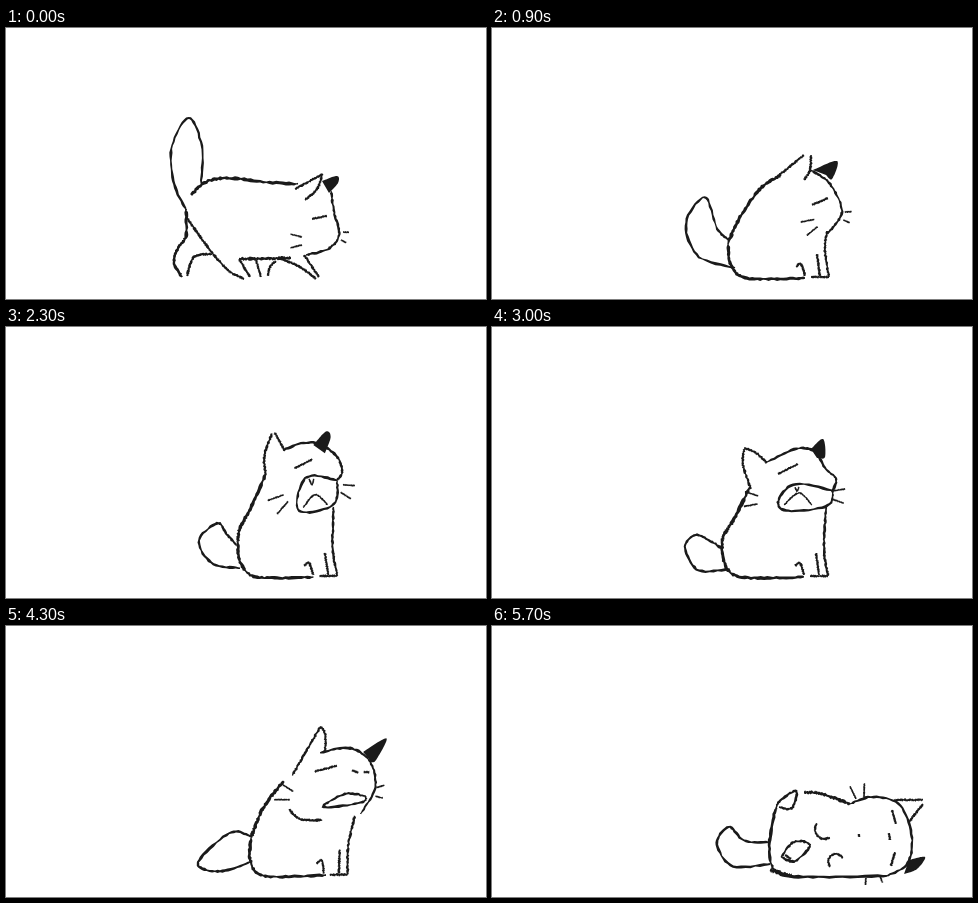
An HTML page that plays this animation: 480x271 px, repeating every 5800 ms.

```html
<!DOCTYPE html>
<html lang="en">
<head>
<meta charset="utf-8">
<title>Sleepy cat</title>
<style>
html, body { margin: 0; width: 100%; height: 100%; overflow: hidden; background: #fff; }
svg { display: block; width: 100vw; height: 100vh; }
path { fill: #1a1a1a; }
</style>
</head>
<body>
<svg id="stage" viewBox="0 0 480 271"></svg>
<script>
const LOOP = 5800, STEP = 100, FLOOR = 253, SAMPLES = 48;

const mix = (a, b, u) => a + (b - a) * u;
const noise = n => { const s = Math.sin(n * 12.9898) * 43758.5453; return s - Math.floor(s); };
const polar = (x, y, r, deg) => [x + r * Math.cos(deg * Math.PI / 180), y + r * Math.sin(deg * Math.PI / 180)];

// Stroke makers: all return a few points that a smooth curve runs through.
const line = text => text.split(' ').map(p => p.split(',').map(Number));
const arc = (x, y, r, from, to) => [0, 1, 2, 3, 4].map(i => polar(x, y, r, mix(from, to, i / 4)));

// Two hairs that spread from a spot.
function hairs(name, x, y, dir, length, gap = 4) {
  const hair = side => {
    const root = polar(x, y, gap * side, dir + 90);
    return [root, polar(...root, length, dir + 14 * side)];
  };
  return { [name + 'A']: hair(-1), [name + 'B']: hair(1) };
}

// The lower body shared by all sitting poses.
const seated = (left, right, chest) => ({
  rump: [[left, 215], [left + 2, 235], [left + 14, 249], [right - 55, 251], [right - 22, 250]],
  foot: [[right - 31, 239], [right - 26, 236], [right - 22, 248]],
  leg: [[right - 10, 226], [right - 7, 248]],
  front: [[right, chest], [right - 2, 222], [right + 2, 249]],
  paw: [[right - 16, 249], [right + 2, 249]]
});

const walk = {
  tail: line('195,158 196,120 183,90 166,118 168,155 180,182'),
  back: line('292,156 258,154 222,150 200,154 185,167'),
  rump: line('180,181 180,208 172,220 168,235 176,249'),
  haunch: line('181,190 193,207 207,226'),
  hindFar: line('206,226 188,229 181,248'),
  foot: line('207,226 223,243 238,251'),
  hind: line('233,231 244,249'),
  belly: line('233,231 285,230'),
  frontFarA: line('250,232 255,249'),
  frontFarB: line('270,233 264,239 262,248'),
  leg: line('275,231 294,239 310,251'),
  front: line('298,227 313,249'),
  ear: line('289,161 317,146'),
  ear2: line('316,147 311,161 299,172'),
  black: line('316,153 331,148 332,155 323,165'),
  top: line('325,163 328,184 333,207 322,221 300,227'),
  eye: line('306,191 321,188'),
  ...hairs('cheek', 296, 213, 180, 12),
  ...hairs('whisker', 336, 208, 15, 6)
};
const sit = {
  ...seated(236, 335, 203),
  tail: line('237,212 225,200 213,169 194,195 206,228 243,240'),
  back: line('289,147 268,161 247,191 236,215'),
  ear: line('285,149 312,127'),
  ear2: line('319,127 318,142 312,152'),
  black: line('321,142 345,133 340,151 334,147'),
  top: line('319,142 338,156 350,184 335,206'),
  eye: line('320,177 336,170'),
  ...hairs('cheek', 324, 195, 155, 14),
  ...hairs('whisker', 352, 188, 10, 7)
};
const yawn = {
  ...seated(233, 329, 180),
  tail: line('232,218 222,206 214,195 194,213 207,236 234,241'),
  back: line('263,146 248,178 236,200 233,215'),
  ear: line('263,147 263,128 272,105'),
  ear2: line('275,104 283,123'),
  black: line('310,118 323,104 328,108 322,126'),
  top: line('281,122 308,115 333,127 339,143 333,152'),
  eye: line('292,141 310,132'),
  mouth: line('333,152 303,150 295,184 329,178 333,152'),
  tongue: line('300,181 312,168 324,178'),
  fang: line('306,151 309,157 311,151'),
  ...hairs('cheek', 284, 171, 143, 18),
  ...hairs('whisker', 338, 161, 20, 12)
};
const wail = {
  ...seated(230, 334, 180),
  tail: line('231,222 218,214 204,208 193,220 206,243 238,242'),
  back: line('258,160 242,192 232,208 230,215'),
  ear: line('259,162 251,138 252,122'),
  ear2: line('252,121 264,126 275,136'),
  black: line('319,122 331,112 333,130 325,131'),
  top: line('275,135 303,122 322,124 333,141 344,152 340,165'),
  eye: line('286,147 306,137'),
  mouth: line('341,164 303,157 286,175 297,184 335,179 341,164'),
  tongue: line('292,178 307,166 320,178'),
  fang: line('303,160 305,164 307,160'),
  ...hairs('cheek', 266, 173, 184, 14),
  ...hairs('whisker', 340, 168, 5, 13)
};
const settle = {
  ...seated(238, 339, 195),
  tail: line('238,215 216,212 188,240 212,247 242,237'),
  back: line('260,163 245,188 238,215'),
  ear: line('267,158 288,112'),
  ear2: line('288,112 294,120 296,135'),
  black: line('335,134 356,121 349,141 345,143'),
  top: line('293,136 322,132 344,144 353,168 343,192'),
  eye: line('289,154 311,148'),
  eye2: line('327,152 334,154'),
  eye3: line('339,153 345,153'),
  mouth: line('347,177 326,175 306,187 343,183 347,177'),
  chin: line('272,189 285,198 307,199'),
  ...hairs('cheek', 270, 177, 193, 16),
  ...hairs('whisker', 355, 171, -3, 8)
};
const flop = {
  tail: line('269,180 250,170 229,184 249,197 261,215 273,234'),
  back: line('346,161 312,162 280,177 267,200'),
  rump: line('267,200 272,231 292,250 340,247 390,231'),
  ground: line('277,248 300,251'),
  ear: line('375,151 380,140 389,131'),
  ear2: line('390,131 395,134 395,157'),
  black: line('414,198 437,203 431,213 410,222'),
  top: line('346,161 375,152 402,168 414,195 390,231'),
  eye: line('386,160 392,171'),
  eye2: line('395,184 396,191'),
  eye3: line('404,201 402,211'),
  nose: line('369,196 370,198'),
  pawA: arc(295, 208, 9, -45, 150),
  pawB: arc(331, 196, 11, -95, -270),
  pawC: arc(310, 243, 9, 175, 360),
  pawD: arc(343, 234, 8, 160, 300),
  ...hairs('cheek', 359, 153, 254, 12, 7),
  ...hairs('whisker', 396, 230, 42, 8)
};
const sleep = {
  tail: line('278,216 253,215 237,201 225,217 240,240 278,238'),
  back: line('358,178 330,168 312,166'),
  rump: line('283,184 278,212 279,238 292,249 335,251 395,250'),
  ground: line('278,244 300,250'),
  hind: line('283,188 287,176 304,165 300,182 287,181'),
  ear: line('402,174 431,174'),
  ear2: line('431,178 417,196'),
  black: line('417,234 433,231 425,243 412,248'),
  top: line('358,178 380,171 408,179 420,212 415,238 395,250'),
  eye: line('400,184 404,198'),
  eye2: line('397,207 398,214'),
  eye3: line('403,226 399,240'),
  nose: line('367,208 367,211'),
  pawA: line('289,231 302,216 318,219 303,235 289,231'),
  pawB: arc(333, 203, 10, 215, 60),
  pawC: line('293,229 299,233'),
  pawD: arc(344, 236, 8, 140, 330),
  ...hairs('cheek', 368, 172, 258, 14),
  ...hairs('whisker', 381, 251, 82, 7, 7)
};

const widths = { back: 3, rump: 2.8, belly: 3, ground: 3.4, eye: 2.2 };
const isThin = name => /cheek|whisker|fang|tongue/.test(name);
const widthOf = name => widths[name] || (isThin(name) ? 1.7 : 2.3);
const swings = { hindFar: 1, foot: -1, hind: -1, frontFarA: -1, frontFarB: -1, leg: 1, front: 1 };

// Catmull-Rom resampling to a fixed number of points.
function sample(pts) {
  const last = pts.length - 1, at = i => pts[Math.max(0, Math.min(last, i))];
  return Array.from({ length: SAMPLES }, (_, k) => {
    const x = k / (SAMPLES - 1) * last, i = Math.min(Math.floor(x), last - 1), t = x - i;
    const [a, b, c, d] = [at(i - 1), at(i), at(i + 1), at(i + 2)];
    return [0, 1].map(j => b[j] + t / 2 * (c[j] - a[j] + t * (2 * a[j] - 5 * b[j] + 4 * c[j] - d[j]
      + t * (3 * (b[j] - c[j]) + d[j] - a[j]))));
  });
}

function key(time, pose, { dx = 0, lean = 0, tall = 1, swing = 0 } = {}) {
  const strokes = {};
  for (const name in pose) {
    const step = swing * (swings[name] || 0);
    strokes[name] = sample(pose[name]).map(([x, y]) => {
      const up = FLOOR - y;
      return [x + dx + lean * up + step * Math.max(0, y - 226), FLOOR - up * tall];
    });
  }
  return { time, strokes };
}

const keys = [
  key(0, walk),
  key(200, walk, { dx: 13, swing: -0.5 }),
  key(400, walk, { dx: 27 }),
  key(700, sit, { dx: 6 }),
  key(900, sit),
  key(1100, sit, { tall: 1.02 }),
  key(1500, yawn),
  key(1800, yawn),
  key(2200, yawn, { lean: -0.03 }),
  key(2700, wail, { tall: 1.02 }),
  key(3000, wail),
  key(3300, wail, { tall: 1.01 }),
  key(3700, settle),
  key(3900, settle),
  key(4250, settle, { lean: 0.17, tall: 1.09 }),
  key(4700, flop),
  key(5000, flop),
  key(5500, sleep),
  key(LOOP, sleep)
];

function poseAt(time) {
  const i = keys.findIndex(k => k.time > time), from = keys[i - 1], to = keys[i];
  const raw = (time - from.time) / (to.time - from.time), u = raw * raw * (3 - 2 * raw);
  const out = {};
  for (const name in { ...from.strokes, ...to.strokes }) {
    const a = from.strokes[name], b = to.strokes[name];
    if (a && b) out[name] = a.map((p, k) => [mix(p[0], b[k][0], u), mix(p[1], b[k][1], u)]);
    else if (u < 0.5 ? a : b) out[name] = a || b;
  }
  return out;
}

const toPath = pts => 'M' + pts.map(p => p[0].toFixed(1) + ' ' + p[1].toFixed(1)).join('L') + 'Z';

// A brush line: a ribbon of uneven width with tapered ends.
function ribbon(pts, width, seed) {
  const left = [], right = [], last = pts.length - 1;
  pts.forEach(([x, y], i) => {
    const a = pts[Math.max(0, i - 1)], b = pts[Math.min(last, i + 1)];
    const dx = b[0] - a[0], dy = b[1] - a[1], len = Math.hypot(dx, dy) || 1;
    const taper = Math.min(1, 0.6 + Math.min(i, last - i) * 0.15);
    const half = width / 2 * taper, nx = -dy / len, ny = dx / len;
    const l = half * (0.5 + noise(seed + i)), r = half * (0.5 + noise(seed + i + 50));
    left.push([x + nx * l, y + ny * l]);
    right.unshift([x - nx * r, y - ny * r]);
  });
  return toPath(left.concat(right));
}

const stage = document.getElementById('stage');
const names = [...new Set(keys.flatMap(k => Object.keys(k.strokes)))];
const paths = names.map(() =>
  stage.appendChild(document.createElementNS('http://www.w3.org/2000/svg', 'path')));

function draw(time) {
  const pose = poseAt(time);
  names.forEach((name, i) => {
    const pts = pose[name];
    const d = !pts ? '' : name === 'black' ? toPath(pts)
      : ribbon(pts, widthOf(name), i * 101 + time / STEP * 7);
    paths[i].setAttribute('d', d);
  });
}

const start = performance.now();
function tick() {
  const time = (performance.now() - start) % LOOP;
  draw(Math.floor(time / STEP) * STEP);
  requestAnimationFrame(tick);
}
tick();
</script>
</body>
</html>
```
